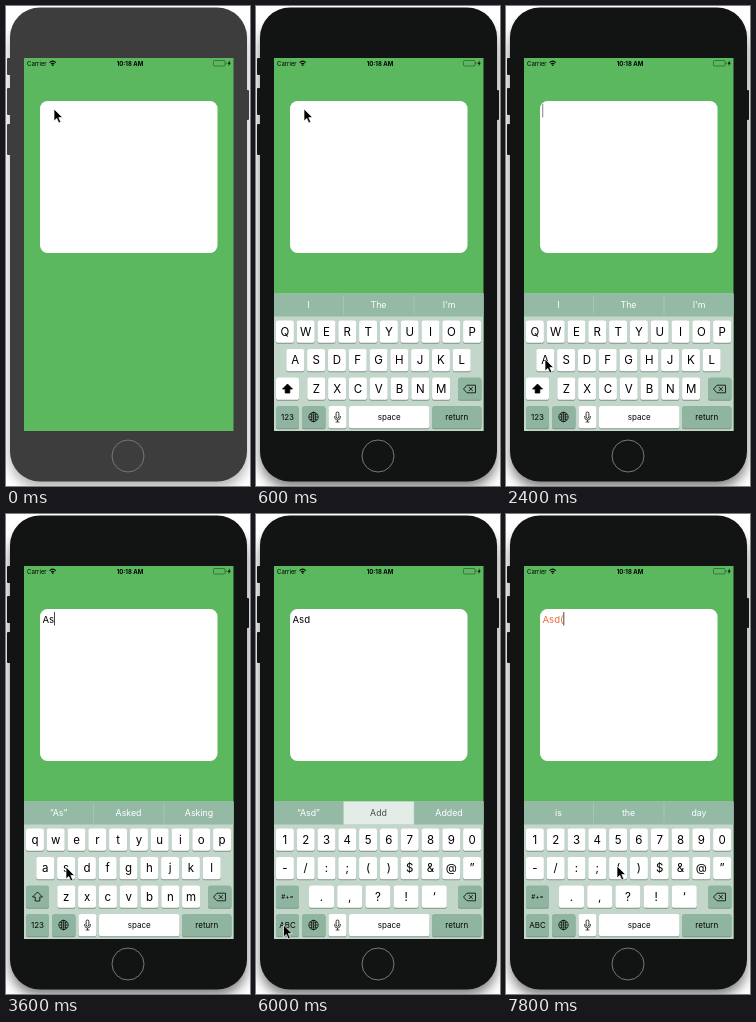
These frames come from a looping animation (244x480 px, 8000 ms). An HTML page:

```html
<!DOCTYPE html>
<html lang="en">
<head>
<meta charset="utf-8">
<title>Typing demo</title>
<style>
  html, body { margin: 0; width: 100%; height: 100%; overflow: hidden; background: #fff; }
  svg { display: block; width: 100%; height: 100%; }
  text { font-family: Inter, "Liberation Sans", sans-serif; fill: #000; }
  .mid { text-anchor: middle; }
</style>
</head>
<body>
<svg id="stage" viewBox="0 0 244 480">
  <defs>
    <clipPath id="screen"><rect x="18" y="52" width="209.5" height="373"/></clipPath>
    <filter id="soft" x="-20%" y="-20%" width="140%" height="140%"><feGaussianBlur stdDeviation="6"/></filter>
  </defs>
  <rect width="244" height="480" fill="#fff"/>
  <rect id="shade" x="4" y="14" width="237" height="468" rx="30" filter="url(#soft)"/>
  <g id="body">
    <rect x="1" y="52" width="5" height="17" rx="1"/>
    <rect x="1" y="82" width="5" height="27" rx="1"/>
    <rect x="1" y="118" width="5" height="31" rx="1"/>
    <rect x="238" y="84" width="5" height="30" rx="1"/>
    <rect x="4" y="1.5" width="237" height="474" rx="30"/>
  </g>
  <circle cx="122" cy="450" r="16" fill="none" stroke="#777" stroke-width="1"/>
  <g clip-path="url(#screen)">
    <rect x="18" y="52" width="210" height="374" fill="#5bb85e"/>
    <text x="21" y="59.7" font-size="6">Carrier</text>
    <g fill="none" stroke="#000" stroke-width="1.1">
      <path d="M43.6 56.6Q46.7 53.6 49.8 56.6M45 58.2Q46.7 56.6 48.4 58.2"/>
    </g>
    <circle cx="46.7" cy="59.3" r=".8"/>
    <text class="mid" x="124" y="59.7" font-size="6" font-weight="700">10:18 AM</text>
    <rect x="207.5" y="54.5" width="11.5" height="5.5" rx="1" fill="none" stroke="#2d5c2f" stroke-width=".7"/>
    <rect x="219.6" y="56.3" width=".9" height="2" fill="#2d5c2f"/>
    <path d="M223.8 54.2L221.6 57.7H223L222.4 60.3L224.8 56.7H223.3Z"/>
    <rect x="34" y="95" width="177.5" height="152" rx="7.5" fill="#fff"/>
    <rect id="mark" x="35.5" y="99" width="19.5" height="12.5" fill="#d6d9d8"/>
    <text id="typed" x="36.5" y="108.7" font-size="9.6"></text>
    <rect id="caret" y="98" width=".9" height="13.5"/>
    <g id="board"></g>
  </g>
  <path id="pointer" d="M0 0V12L2.8 9.4L4.8 14L6.8 13.1L4.8 8.6H8.6Z" fill="#000" stroke="#fff" stroke-width=".7"/>
</svg>
<script>
const NS = 'http://www.w3.org/2000/svg';
const $ = id => document.getElementById(id);
const board = $('board');
const DARK = '#8fb5a1', LIGHT = '#fff', PITCH = 20.8;

function add(parent, tag, attrs, label) {
  const el = document.createElementNS(NS, tag);
  for (const k in attrs) el.setAttribute(k, attrs[k]);
  if (label) el.textContent = label;
  parent.appendChild(el);
  return el;
}

function key(parent, x, y, w, fill, label = '', size = 11.5) {
  add(parent, 'rect', { x, y: y + 1, width: w, height: 22.3, rx: 2.6, fill: '#7f9488' });
  add(parent, 'rect', { x, y, width: w, height: 22.3, rx: 2.6, fill });
  if (label) add(parent, 'text', { class: 'mid', x: x + w / 2, y: y + 11.2 + size * .36, 'font-size': size }, label);
}

function row(parent, chars, cx, y, pitch = PITCH, w = 18) {
  [...chars].forEach((c, i) => key(parent, cx + i * pitch - w / 2, y, w, LIGHT, c));
}

// Keyboard background and suggestion strip
add(board, 'rect', { x: 18, y: 287.5, width: 210, height: 140, fill: '#c2d6ca' });
add(board, 'rect', { x: 18, y: 287.5, width: 210, height: 23, fill: '#94b9a5' });
const picked = add(board, 'rect', { x: 87.5, y: 287.5, width: 70.5, height: 23, fill: '#e3ece6' });
for (const x of [87.5, 158]) add(board, 'path', { d: `M${x} 289V309`, stroke: '#b3cdbf', 'stroke-width': .6 });
const hints = [52.5, 122.5, 193].map(x => add(board, 'text', { class: 'mid', x, y: 301.5, 'font-size': 8.8 }));

// Keys that stay on every layout
key(board, 202, 371.5, 23.5, DARK);
add(board, 'path', { d: 'M207.5 383L211 379.2H219.5V386.8H211ZM212.8 381L216.8 385M216.8 381L212.8 385',
  fill: 'none', stroke: '#000', 'stroke-width': .8 });
key(board, 46, 400, 23.5, DARK);
add(board, 'path', { d: 'M52.8 411H62.2M57.5 406.3V415.7M53.8 408.3Q57.5 410 61.2 408.3M53.8 413.7Q57.5 412 61.2 413.7',
  fill: 'none', stroke: '#000', 'stroke-width': .6 });
for (const rx of [4.7, 2.2])
  add(board, 'ellipse', { cx: 57.5, cy: 411, rx, ry: 4.7, fill: 'none', stroke: '#000', 'stroke-width': .7 });
key(board, 72.5, 400, 18, LIGHT);
add(board, 'rect', { x: 80.1, y: 406, width: 2.8, height: 6.3, rx: 1.4, fill: 'none', stroke: '#000', 'stroke-width': .8 });
add(board, 'path', { d: 'M78.6 410V411Q78.6 414 81.5 414T84.4 411V410M81.5 414V416M79.6 416H83.4',
  fill: 'none', stroke: '#000', 'stroke-width': .7 });
key(board, 93, 400, 80.5, LIGHT, 'space', 8);
key(board, 176, 400, 49.5, DARK, 'return', 8);

function letters(upper) {
  const g = add(board, 'g', {});
  const cased = s => upper ? s : s.toLowerCase();
  row(g, cased('QWERTYUIOP'), 28.9, 314.5);
  row(g, cased('ASDFGHJKL'), 39.3, 343);
  row(g, cased('ZXCVBNM'), 60.3, 371.5);
  key(g, 20, 371.5, 23, upper ? LIGHT : DARK);
  add(g, 'path', { d: 'M31.5 378L36.5 383H33.8V387H29.2V383H26.5Z', fill: upper ? '#000' : 'none',
    stroke: '#000', 'stroke-width': .8, 'stroke-linejoin': 'round' });
  key(g, 20, 400, 23, DARK, '123', 8);
  return g;
}

function numbers() {
  const g = add(board, 'g', {});
  row(g, '1234567890', 28.9, 314.5);
  row(g, '-/:;()$&@”', 28.9, 343);
  row(g, '.,?!‘', 65.5, 371.5, 28.2, 25);
  key(g, 20, 371.5, 23, DARK, '#+=', 6.3);
  key(g, 20, 400, 23, DARK, 'ABC', 8);
  return g;
}

const layouts = { up: letters(true), low: letters(false), num: numbers() };

const START = ['I', 'The', "I'm"];
const ONE = ['“A”', 'And', 'All'];
const TWO = ['“As”', 'Asked', 'Asking'];
const THREE = ['“Asd”', 'Add', 'Added'];
const END = ['is', 'the', 'day'];

// [start ms, changed state]
const states = [
  [0, { drop: 140, text: '', keys: 'up', hints: START, ink: '#000' }],
  [300, { drop: 40 }],
  [600, { drop: 0 }],
  [2700, { text: 'A', keys: 'low', hints: ONE }],
  [3600, { text: 'As', hints: TWO }],
  [4200, { text: 'Asd', hints: THREE, marked: true }],
  [5400, { keys: 'num', marked: false }],
  [7500, { text: 'Asd(', hints: END, ink: '#ee6a3c' }]
];

// [ms, x, y] pointer stops
const path = [
  [0, 48, 103], [600, 48, 103], [1200, 99, 322], [1500, 99, 322], [2400, 39, 353], [3000, 39, 353],
  [3600, 60, 353], [4200, 81, 353], [4500, 81, 353], [5100, 37, 415], [5400, 37, 415],
  [6000, 27.5, 411], [6300, 27.5, 411], [7200, 111, 352], [8000, 111, 352]
];

function pointerAt(t) {
  const i = path.findIndex(p => p[0] > t);
  const [t0, x0, y0] = path[i - 1], [t1, x1, y1] = path[i];
  const u = (t - t0) / (t1 - t0), e = u * u * (3 - 2 * u);
  return [x0 + (x1 - x0) * e, y0 + (y1 - y0) * e];
}

const show = (el, on) => el.setAttribute('display', on ? 'inline' : 'none');

function draw(t) {
  const s = {};
  let since = 0;
  for (const [at, change] of states) if (at <= t) {
    Object.assign(s, change);
    if (change.text) since = at;
  }
  const idle = t === 0;
  $('body').setAttribute('fill', idle ? '#3d3d3d' : '#121313');
  $('shade').setAttribute('fill-opacity', idle ? .3 : .5);
  board.setAttribute('transform', `translate(0 ${s.drop})`);
  for (const k in layouts) show(layouts[k], k === s.keys);
  const pick = s.hints === THREE;
  show(picked, pick);
  hints.forEach((h, i) => {
    h.textContent = s.hints[i];
    h.style.fill = pick && i === 1 ? '#4c5550' : '#fff';
  });
  $('typed').textContent = s.text;
  $('typed').style.fill = s.ink;
  show($('mark'), s.marked);
  const wide = s.text ? $('typed').getComputedTextLength() : 0;
  $('caret').setAttribute('x', 36.3 + wide);
  $('caret').setAttribute('fill', s.text ? '#333' : '#777');
  const phase = (since ? t - since : t + 200) % 1000;
  show($('caret'), !idle && !s.marked && phase <= 600);
  $('pointer').setAttribute('transform', `translate(${pointerAt(t)})`);
}

const began = performance.now();
let last = -1;
function tick() {
  const t = (performance.now() - began) % 8000;
  const step = Math.floor(t / 300) * 300;
  if (step !== last) draw(last = step);
  requestAnimationFrame(tick);
}
tick();
</script>
</body>
</html>
```
